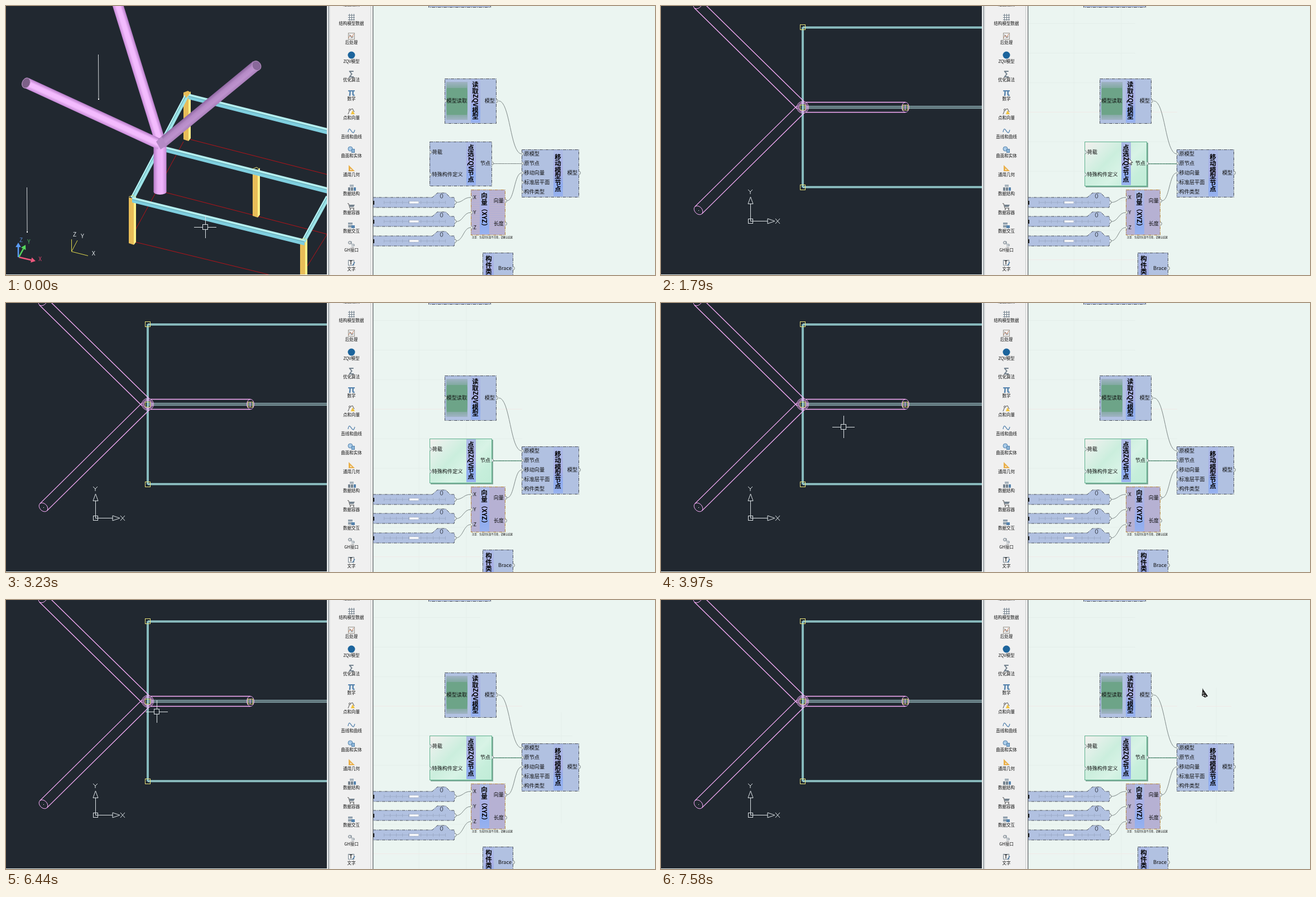
Write an HTML page with a canvas that moves like this. It is 1163 px wide and 482 px high and loops after 8 s.

```html
<!DOCTYPE html>
<html lang="zh">
<head>
<meta charset="utf-8">
<style>
html, body { margin: 0; width: 100%; height: 100%; overflow: hidden; background: #ebf5f1; }
canvas { display: block; }
</style>
</head>
<body>
<canvas id="stage" width="1163" height="482"></canvas>
<script>
const c = document.getElementById('stage').getContext('2d');
const LOOP = 8000;
const FONT = '"Noto Sans CJK SC", "Noto Sans CJK", sans-serif';
const BRAND = 'ZQV';
const PINK = '#fcb0fd', GOLD = '#e9e27a', PALE = '#dde3e6';

// Pointer steps: [start, kind, x, y]
const POINTER = [
  [0, 'cross', 357, 396], [150, 'cross', 347, 475], [300],
  [1000, 'arrow', 942, 300], [1120, 'arrow', 862, 273], [1270, 'arrow', 845, 272],
  [1670, 'arrow', 838, 273], [1930, 'arrow', 885, 325], [2060, 'arrow', 927, 380],
  [2210, 'arrow', 905, 365], [2330, 'arrow', 890, 355], [2450, 'arrow', 881, 349],
  [2570, 'arrow', 640, 260], [2690, 'cross', 320, 180], [2810, 'cross', 191, 140],
  [2960, 'cross', 180, 145], [3080, 'cross', 162, 142], [3230],
  [3480, 'cross', 181, 170], [3600, 'cross', 245, 195], [3720, 'cross', 300, 215],
  [3970, 'cross', 327, 222], [4500, 'cross', 390, 235], [4620, 'cross', 455, 248],
  [4760, 'cross', 540, 250], [4880, 'arrow', 710, 245], [5000, 'arrow', 860, 240],
  [5130, 'arrow', 956, 253], [5280, 'compass', 1003, 370], [5430, 'arrow', 745, 300], [5550],
  [6320, 'cross', 420, 260], [6440, 'cross', 270, 200], [6560, 'cross', 224, 160],
  [6680, 'cross', 300, 260], [6800, 'arrow', 333, 298],
  [7040, 'cross', 548, 266], [7190, 'arrow', 800, 210], [7310, 'compass', 1009, 162],
  [7460, 'compass', 990, 161], [7580, 'compass', 971, 161]
];

function line(color, width, ...pts) {
  path(pts);
  c.strokeStyle = color;
  c.lineWidth = width;
  c.stroke();
}
function path(pts) {
  c.beginPath();
  for (let i = 0; i < pts.length; i += 2) c.lineTo(pts[i], pts[i + 1]);
}
function poly(fill, ...pts) {
  path(pts);
  c.closePath();
  c.fillStyle = fill;
  c.fill();
}
function rect(fill, x, y, w, h) {
  c.fillStyle = fill;
  c.fillRect(x, y, w, h);
}
function box(color, x, y, w, h, width = 1) {
  c.strokeStyle = color;
  c.lineWidth = width;
  c.strokeRect(x + .5, y + .5, w, h);
}
function oval(x, y, rx, ry, stroke, fill, turn = 0) {
  c.beginPath();
  c.ellipse(x, y, rx, ry, turn, 0, 7);
  if (fill) { c.fillStyle = fill; c.fill(); }
  if (stroke) { c.strokeStyle = stroke; c.lineWidth = 1; c.stroke(); }
}
function text(str, x, y, size = 9.2, color = '#111', align = 'left', weight = 400) {
  c.font = `${weight} ${size}px ${FONT}`;
  c.textAlign = align;
  c.fillStyle = color;
  c.fillText(str, x, y + size * .38);
}
function fade(x1, y1, x2, y2, ...colors) {
  const g = c.createLinearGradient(x1, y1, x2, y2);
  colors.forEach((k, i) => g.addColorStop(i / (colors.length - 1), k));
  return g;
}

// Column of upright characters, with Latin runs turned sideways
function verticalText(str, x, y, size = 11.5) {
  for (const run of str.match(/[A-Z（）]+|./g)) {
    if (!/[A-Z]/.test(run)) {
      text(run, x, y + size / 2, size, '#000', 'center', 700);
      y += size;
      continue;
    }
    c.save();
    c.translate(x, y);
    c.rotate(Math.PI / 2);
    text(run, 0, 0, size, '#000', 'left', 700);
    y += c.measureText(run).width;
    c.restore();
  }
}

function tube(x1, y1, x2, y2, r, ...colors) {
  const d = Math.hypot(x2 - x1, y2 - y1), nx = (y2 - y1) / d * r, ny = (x1 - x2) / d * r;
  line(fade(x1 + nx, y1 + ny, x1 - nx, y1 - ny, ...colors), 2 * r, x1, y1, x2, y2);
}
function beam(x1, y1, x2, y2) {
  poly('#7fcfdf', x1, y1, x2, y2, x2, y2 + 10, x1, y1 + 9);
  poly('#b4eeee', x1, y1 - 1, x2, y2 - 1, x2, y2 + 3, x1, y1 + 3);
  line('#477f8a', .6, x1, y1 + 3.5, x2, y2 + 3.5);
}
function sideBeam(x1, y1, x2, y2) {
  line('#9ce4e8', 8, x1, y1, x2, y2);
  line('#4c8a94', .7, x1 - 1, y1, x2 - 1, y2);
  line('#d0fbfa', 1, x1 - 3, y1 - 1, x2 - 3, y2 - 1);
}
function post(x, y, h) {
  poly('#e8bd58', x, y, x + 9, y + 2, x + 9, y + h, x, y + h - 3);
  poly('#fff28a', x + 9, y + 2, x + 13, y - 2, x + 13, y + h - 5, x + 9, y + h);
}
function arrow3d(color, x1, y1, x2, y2) {
  const a = Math.atan2(y2 - y1, x2 - x1), ux = Math.cos(a) * 8, uy = Math.sin(a) * 8;
  line(color, 2.5, x1, y1, x2 - ux, y2 - uy);
  poly(color, x2, y2, x2 - ux - uy * .6, y2 - uy + ux * .6, x2 - ux + uy * .6, y2 - uy - ux * .6);
}

function perspectiveView() {
  const red = '#b51218';
  line(red, 1, 330, 239, 576, 302);
  line(red, 1, 278, 332, 576, 409);
  line(red, 1, 232, 423, 478, 483);
  line(red, 1, 318, 243, 226, 412);
  line(red, 1, 540, 466, 576, 408);
  post(318, 155, 87);
  post(442, 292, 87);
  post(220, 343, 85);
  post(527, 419, 75);
  beam(327, 158, 576, 220);
  beam(279, 251, 576, 326);
  sideBeam(324, 160, 227, 344);
  sideBeam(577, 342, 533, 422);
  beam(226, 343, 535, 419);
  poly('#e8bd58', 318, 155, 326, 152, 331, 155, 323, 165);
  line(GOLD, 1, 442, 292, 449, 289, 455, 293);
  line(GOLD, 1, 220, 342, 227, 339, 232, 343);
  line(GOLD, 1, 527, 419, 534, 416, 540, 420);

  const pinks = ['#b77dc8', '#f4baff', '#f3bcfd', '#c88bd8'];
  tube(276, 250, 276, 333, 11.5, '#c58ad6', '#f0b4fc', '#e9aef6', '#b57bc6');
  oval(276, 333, 11.5, 5, null, fade(264, 0, 288, 0, '#b57bc6', '#e9aef6', '#f0b4fc', '#c58ad6'));
  tube(196, -16, 277, 245, 9.5, ...pinks);
  tube(37, 138, 276, 248, 9.5, ...pinks);
  tube(449, 106, 279, 246, 9.5, '#aa80bb', '#bd92ce', '#b58ac6', '#8d66a0');
  poly('#b58ac6', 269, 243, 279, 234, 288, 250, 277, 257);
  oval(36, 138, 7, 9.5, '#caa0d4', '#7d6088', .4);
  oval(449, 107, 7.5, 9, '#c09acc', '#89689a', -.6);

  for (const [x, y] of [[165.5, 87], [37.5, 325]]) {
    line('#d5d9dc', 1, x, y, x + .5, y + 80);
    rect('#fff', x - .5, y + 79, 2, 2);
  }
  arrow3d('#f0587e', 23, 450, 53, 457);
  arrow3d('#56d85c', 23, 450, 35, 428);
  arrow3d('#5b9cf5', 22, 450, 22, 424);
  text('Z', 27, 419, 10, '#5b8fd8', 'center');
  text('Y', 41, 422, 10, '#4db860', 'center');
  text('X', 61, 453, 10, '#d8416c', 'center');
  line('#e0d84c', 1, 117.5, 418, 117.5, 440, 147, 447.5);
  line('#e0d84c', 1, 117.5, 440, 128, 420);
  text('Z', 123, 409, 11, PALE, 'center');
  text('Y', 137, 412, 11, PALE, 'center');
  text('X', 157, 443, 11, PALE, 'center');
}

// Outline of a pipe running from a far end cap into the hub
function pipe(x, y, hubX, hubY) {
  const a = Math.atan2(hubY - y, hubX - x), ux = Math.cos(a), uy = Math.sin(a), r = 9;
  for (const s of [-r, r])
    line(PINK, 1.3, x - uy * s, y + ux * s, hubX - uy * s - ux * 5, hubY + ux * s - uy * 5);
  oval(x, y, 6.5, r, PINK, null, a);
}

function planView() {
  const rail = (x1, y1, x2, y2) => {
    const dx = x1 === x2 ? 1 : 0, dy = 1 - dx;
    line('#4f8488', 4, x1, y1, x2, y2);
    for (const k of [-1, 1])
      line('#bfeff0', 1, x1 + k * dx, y1 + k * dy, x2 + k * dx, y2 + k * dy);
  };
  rail(254, 38.5, 576, 38.5);
  rail(254, 324.5, 576, 324.5);
  rail(254, 38, 254, 325);
  for (const y of [179.5, 181.5, 183.5]) line('#a9d0d3', 1, 254, y, 576, y);
  for (const [x, y] of [[249, 33], [249, 320], [249, 177]]) box(GOLD, x, y, 9, 9);
  box(GOLD, 433, 177, 9, 9);

  pipe(438, 181.5, 254, 181.5);
  pipe(66, -3, 254, 181.5);
  pipe(67, 366, 254, 181.5);
  line(PINK, 1, 437.5, 177, 437.5, 186);
  rect('#fff', 67, 366, 1, 1);
  for (const r of [10.5, 8.5, 7]) oval(254, 181.5, r, r, PINK);

  box(PALE, 156, 381, 8, 8);
  line(PALE, 1, 160.5, 385, 160.5, 354.5, 156, 354.5, 160.5, 342, 165, 354.5, 160, 354.5);
  line(PALE, 1, 160, 385.5, 191, 385.5, 191, 381, 204, 385.5, 191, 390, 191, 385);
  line(PALE, 1, 205, 381, 213, 390);
  line(PALE, 1, 213, 381, 205, 390);
  line(PALE, 1, 156, 329, 160, 333, 164, 329);
  line(PALE, 1, 160, 333, 160, 337);
}

const BLUE = '#5583ad', GREY = '#75838f';
const TOOLS = [
  ['结构模型数据', () => {
    for (const k of [-3.5, .5, 4.5]) {
      line(GREY, 1, k, -6, k, 6);
      line(GREY, 1, -6, k, 6, k);
    }
  }],
  ['后处理', () => {
    box('#9a958c', -6, -6, 11, 11);
    line('#c27a55', 1, -5, 3, -2, -2, 1, 2, 4, -4);
    line(GREY, 1, -4, -3, 0, 3, 4, 1);
  }],
  [BRAND + '模型', () => oval(0, 0, 6.5, 6.5, null, '#1c649c')],
  ['优化算法', () => text('Σ', 0, 0, 16, GREY, 'center', 700)],
  ['数学', () => text('π', 0, -1, 18, BLUE, 'center', 700)],
  ['点和向量', () => {
    line('#555', 1, -6, 5, -3, -3, 2, -5, 5, 1);
    poly('#f0c23c', -1, 5, 2, -2, 6, 5);
    oval(-3, -3, 1.5, 1.5, '#555', '#fff');
  }],
  ['直线和曲线', () => {
    c.beginPath();
    c.moveTo(-6, 3);
    c.bezierCurveTo(-3, -14, 2, 15, 6, -1);
    c.strokeStyle = BLUE;
    c.lineWidth = 1.3;
    c.stroke();
  }],
  ['曲面和实体', () => {
    oval(-2, -1, 4, 4, BLUE, '#a9cbe8');
    rect('#8bb5d8', 0, -1, 5, 6);
    box(BLUE, 0, -1, 5, 6);
  }],
  ['通用几何', () => {
    poly('#eab04a', -5, -6, -5, 5, 6, 5);
    poly('#f0f0f0', -2, 0, -2, 3, 1, 3);
  }],
  ['数据结构', () => {
    for (const x of [-6, -1, 4]) rect(x < 0 ? GREY : BLUE, x, 0, 4, 6);
    rect('#a7b3bd', -3, -5, 7, 4);
  }],
  ['数据容器', () => {
    line('#555', 1, -7, -5, -5, -5, -3, 3, 5, 3);
    poly(GREY, -4, -3, 6, -3, 4, 1, -3, 1);
    oval(-2, 5, 1, 1, null, '#444');
    oval(4, 5, 1, 1, null, '#444');
  }],
  ['数据交互', () => {
    rect('#8f9fac', -6, -5, 8, 9);
    line('#fff', 1, -6, -1, 2, -1);
    rect(BLUE, 0, 0, 6, 5);
  }],
  ['GH接口', () => {
    line(GREY, 1, -5, -3, 0, -4, 0, 1, 5, 1, 5, 4, 0, 4);
    oval(-3, -2, 2.5, 2.5, GREY, '#ddd');
  }],
  ['文字', () => {
    box(GREY, -6, -5, 10, 9);
    text('T', -1, 0, 9, '#333', 'center', 700);
    line(BLUE, 1.5, 2, 5, 6, -1);
  }]
];

function toolbar() {
  rect('#eef2f3', 575, 0, 2, 482);
  rect('#a5acb0', 577, 0, 2, 482);
  rect('#dcdfe0', 579, 0, 2, 482);
  rect('#f0f0f0', 581, 0, 76, 482);
  rect('#c9cccc', 653, 0, 1, 482);
  rect('#63696b', 657, 0, 1.3, 482);
  text('绘图渲染', 619, -3, 7.5, '#222', 'center');
  TOOLS.forEach(([label, icon], i) => {
    const y = 31 + i * 33.87;
    c.save();
    c.translate(619, Math.round(y - 11));
    icon();
    c.restore();
    text(label, 619, y, 7.5, '#111', 'center');
  });
}

function canvasGrid(t) {
  const soft = '#e4eeea', rose = '#f1e9e7';
  if (t >= 1270) {
    for (const x of [740, 825]) line(soft, 1, x, 0, x, 482);
    for (let i = 0; i < 9; i++) {
      const y = 31.5 + i * 52.9;
      line(i === 3 || i === 8 ? rose : soft, 1, 658, y, i === 3 || i === 4 ? 925 : 850, y);
    }
  }
  if (t >= 5280) {
    line(soft, 1, 995, t >= 7310 ? 157 : 201, 995, 400);
    line(soft, 1, 925, 243.5, 1015, 243.5);
    if (t >= 7310) line(rose, 1, 960, 190.5, 1022, 190.5);
  }
}

function wire(x1, y1, x2, y2, color = '#7d8786') {
  const m = (x1 + x2) / 2;
  c.beginPath();
  c.moveTo(x1, y1);
  c.bezierCurveTo(m, y1, m, y2, x2, y2);
  c.strokeStyle = color;
  c.lineWidth = 1;
  c.stroke();
}
function grip(x, y) {
  c.beginPath();
  c.arc(x, y, 3, -Math.PI / 2, Math.PI / 2);
  c.fillStyle = '#e9f0f2';
  c.fill();
  c.strokeStyle = '#66706f';
  c.lineWidth = .8;
  c.stroke();
}
function dashed(draw) {
  c.setLineDash([6, 1.5, 1.5, 1.5]);
  draw();
  c.setLineDash([]);
}

// Node card: ports are [label, y]
function card(x, y, w, h, titleX, titleY, title, ins, outs, style = {}) {
  if (style.shadow) rect('#7fab99', x + 2, y + 2, w + 1, h + 1);
  rect(style.fill || '#b1c1e1', x, y, w, h);
  if (style.body) style.body();
  rect(fade(0, y, 0, y + h, '#adbce5', '#a9b4e6', '#a9afe5', '#8facf0', '#98b2ee'), titleX - 8, y + 1, 17, h - 2);
  if (style.shadow) box(style.edge, x, y, w, h);
  else dashed(() => box(style.edge || '#4a505c', x, y, w, h));
  for (const [label, py] of ins) {
    grip(x + .5, py);
    text(label, x + 4.5, py);
  }
  for (const [label, py] of outs) {
    grip(x + w + .5, py);
    text(label, x + w - 2, py, 9.2, '#111', 'right');
  }
  verticalText(title, titleX, titleY);
}

function slider(y) {
  path([657, y, 764, y, 773, y - 8, 788, y - 8, 796, y, 803, y, 805, y + 9, 803, y + 18, 657, y + 18]);
  c.fillStyle = '#b1c1e1';
  c.fill();
  c.strokeStyle = '#4a505c';
  c.lineWidth = 1;
  dashed(() => c.stroke());
  oval(780.5, y - 2.5, 2.3, 3.8, '#3d4350');
  line('#98a6c2', .8, 677, y + 9, 788, y + 9);
  for (let x = 677; x < 789; x += 11) line('#98a6c2', .8, x + .5, y + 6, x + .5, y + 12);
  rect('#fff', 723, y + 7, 17, 4);
  box('#9aa6b8', 722, y + 6.5, 17, 4, .6);
  grip(804, y + 9);
  rect('#111', 658, y + 6, 2, 7);
}

function graph(t) {
  const picked = t >= 1670;
  wire(883, 170, 924, 265);
  wire(873, 282.5, 924, 282.5, picked ? '#548b74' : undefined);
  if (picked) wire(873, 283.5, 924, 283.5, '#a7c6b9');
  wire(898, 349, 924, 299);
  [343, 370, 397].forEach((y, i) => wire(806, 352 + i * 34.5, 833, y));

  rect('#b1c1e1', 757, -5, 111, 7);
  dashed(() => box('#4a505c', 757, -8, 111, 10));
  card(786, 130, 92, 80, 841, 135, `读取${BRAND}模型`, [['', 170]], [['模型', 170]], {
    body() {
      rect(fade(0, 136, 0, 204, '#a0b3c4', '#70a48d', '#6aa386', '#70a48d', '#a0b3c4'), 789, 136, 38, 68);
      rect('#6da488', 790, 147, 36, 48);
    }
  });
  text('模型读取', 789.5, 170);
  const green = {
    fill: fade(765, 235, 864, 330, '#f3efed', '#e0f0e8', '#cbeedd', '#d8f3e6', '#c6eedb', '#c0ecd7'),
    edge: '#5eb18d', shadow: true
  };
  card(759, 243, 111, 79, 833, 247.5, `点选${BRAND}节点`,
    [['荷载', 262], ['特殊构件定义', 302]], [['节点', 282]], picked ? green : {});
  card(924, 257, 102, 85, 989, 264.5, '移动模型节点',
    [['原模型', 265], ['原节点', 282], ['移动向量', 299], ['标准层平面', 316], ['构件类型', 333]],
    [['模型', 299]]);
  [343, 377, 412].forEach(slider);
  card(833, 329, 61, 81, 857, 334, '向量（XYZ）',
    [['X', 343], ['Y', 370], ['Z', 397]], [['向量', 349], ['长度', 390]], {
      fill: '#b6b1d3', edge: '#b8873f',
      body() {
        if (t < 1270) for (let y = 333; y < 410; y += 4) rect('#c0b5cd', 834, y, 60, 1);
      }
    });
  text('注意：生成的矢量不归零，请确认结果', 835, 414, 4.3);
  card(854, 442, 54, 60, 865, 447, '构件类型', [], [['Brace', 470]]);
}

function dialog() {
  c.save();
  c.shadowColor = 'rgba(0,0,0,.4)';
  c.shadowBlur = 13;
  c.shadowOffsetY = 3;
  rect('#f8f8f8', 457, 99, 242, 285);
  c.restore();
  box('#8b8f92', 457, 99, 241, 284, .6);
  text('处理进度', 458.5, 106, 7.5);
  line('#222', 1, 686.5, 103.5, 692.5, 109.5);
  line('#222', 1, 692.5, 103.5, 686.5, 109.5);
  box('#a3a3a3', 471, 132, 217, 138);
  line('#dedede', 1, 677.5, 296, 677.5, 305.5, 519, 305.5);
  line('#5e5e5e', 1.4, 519.5, 305, 519.5, 296, 677, 296);
}

function pointer(t) {
  const [, kind, x, y] = POINTER.findLast(p => p[0] <= t);
  if (!kind) return;
  c.save();
  c.translate(x, y);
  if (kind === 'cross') {
    c.beginPath();
    c.rect(-x, -y, 575, 481);
    c.clip();
    box(PALE, -5, -5, 9, 9);
    line(PALE, 1, -20, .5, -4, .5);
    line(PALE, 1, 4, .5, 20, .5);
    line(PALE, 1, .5, -20, .5, -4);
    line(PALE, 1, .5, 4, .5, 20);
  } else if (kind === 'arrow') {
    path([0, 0, 0, 10.5, 2.4, 8.3, 4, 12, 5.6, 11.3, 4, 7.7, 7.2, 7.5]);
    c.closePath();
    c.fillStyle = '#fff';
    c.fill();
    c.strokeStyle = '#111';
    c.lineWidth = .8;
    c.stroke();
  } else {
    poly('#fff', 0, 0, 8, 11, 4, 13, -1, 10);
    line('#111', 1.3, 0, 0, 8, 11, 4, 13, -1, 10, 0, 0, 4, 13);
    line('#111', 1.5, -1, 9, 3, 7, 7, 11);
  }
  c.restore();
}

function draw(now) {
  const t = now % LOOP;
  rect('#ebf5f1', 0, 0, 1163, 482);
  c.save();
  c.beginPath();
  c.rect(0, 0, 575, 481);
  c.clip();
  rect('#212830', 0, 0, 575, 481);
  (t < 860 ? perspectiveView : planView)();
  c.restore();
  canvasGrid(t);
  graph(t);
  toolbar();
  if (t >= 6680 && t < 7040) dialog();
  pointer(t);
}

const start = performance.now();
function tick() {
  draw(performance.now() - start);
  requestAnimationFrame(tick);
}
tick();
</script>
</body>
</html>
```
